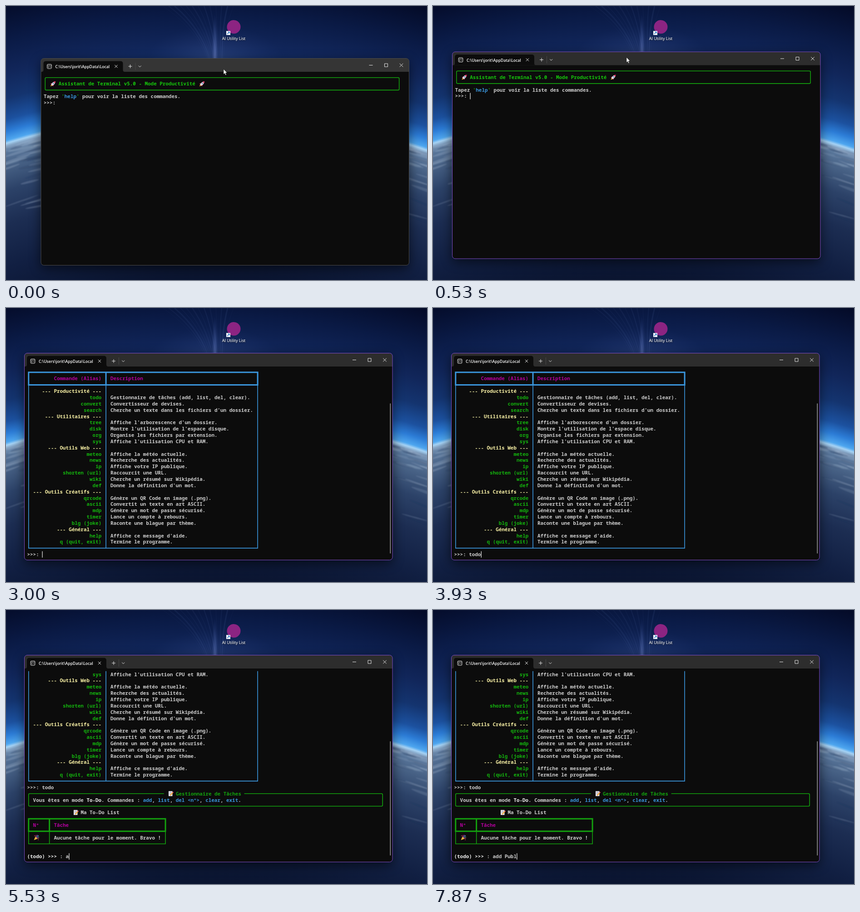
Write an HTML page that moves like this. It is 927 px wide and 604 px high and loops after 8 s.

```html
<!DOCTYPE html>
<html lang="fr">
<head>
<meta charset="utf-8">
<title>Assistant de Terminal</title>
<style>
html, body { margin: 0; width: 100%; height: 100%; overflow: hidden; background: #071029; }
svg { display: block; width: 927px; height: 604px; }
text { white-space: pre; }
.mono { font: 600 10.917px "Noto Sans Mono", "DejaVu Sans Mono", monospace; fill: #ccc; }
.ui { font-family: "Open Sans", "Noto Sans", sans-serif; fill: #fff; }
.strong { font-weight: 700; fill: #f2f2f2; }
</style>
</head>
<body>
<svg id="stage" viewBox="0 0 927 604" xmlns="http://www.w3.org/2000/svg"></svg>
<script>
const LOOP = 8000, STEP = 200 / 3;
const CW = 6.55, LH = 13.846, X0 = 46.5, Y0 = 141.7;
const BLUE = '#3a96dd', GREEN = '#13a10e', LIME = '#16c60c', CMD = '#14b40e',
      PINK = '#b4009e', SAND = '#f9f1a5';

const colX = c => X0 + c * CW;
const midX = c => colX(c + 0.5);
const rowY = r => Y0 + r * LH;
const span = (s, fill) => `<tspan fill="${fill}">${s}</tspan>`;
const strong = s => `<tspan class="strong">${s}</tspan>`;
const put = (c, r, s, fill = '#ccc', extra = '') =>
  `<text class="mono" x="${colX(c)}" y="${rowY(r) + 3.9}" style="fill:${fill}" ${extra}>${s}</text>`;
const line = (d, color, w = 1.6) => `<path d="${d}" fill="none" stroke="${color}" stroke-width="${w}"/>`;

// Table with a heavy header; bounds are given in cells
function grid(r0, r1, mid, right, color) {
  const [l, m, r] = [0, mid, right].map(midX);
  const [t, h, b] = [r0, r0 + 2, r1].map(rowY);
  return line(`M${l} ${t}H${r}V${h}H${l}ZM${m} ${t}V${h}`, color, 3) +
         line(`M${l} ${h}V${b}H${r}V${h}M${m} ${h}V${b}`, color);
}

const at = (x, y, body, turn = 0) => `<g transform="translate(${x} ${y}) rotate(${turn})">${body}</g>`;
const rocket = (x, y) => at(x, y, `
  <path d="M-1.6 4L0 8L1.6 4Z" fill="#ffb02e"/>
  <path d="M-2 0L-4.2 3.6L-2 4ZM2 0L4.2 3.6L2 4Z" fill="#d8245a"/>
  <path d="M0 -7.5C3.2 -4 3 1 2 4H-2C-3 1 -3.2 -4 0 -7.5Z" fill="#dcd9e2"/>
  <path d="M0 -7.5C1.4 -6 2 -5 2.3 -3.8H-2.3C-2 -5 -1.4 -6 0 -7.5Z" fill="#e8315f"/>
  <circle cy="-1.2" r="1.3" fill="#4a6fa8"/>`, 45);
const memo = (x, y) => at(x, y, `
  <path d="M-5 -5.5H3.5V5.5H-5Z" fill="#e9e6ee"/>
  <path d="M-3.5 -3H2M-3.5 -.8H1M-3.5 1.4H-1" stroke="#8f8a9c" stroke-width=".8"/>
  <path d="M-1.5 4L4.3 -2.2" stroke="#f5a52c" stroke-width="2.2"/>
  <path d="M4 -2L5.4 -3.5" stroke="#e8486c" stroke-width="2.2"/>`);
const popper = (x, y) => at(x, y, `
  <path d="M-5.5 5.5L-2.4 -2.2L2.6 2.6Z" fill="#f0b23c"/>
  <path d="M-1 -1C-1 -3 0 -4 -1 -5.5M1 1C3 0 4 2 5.5 1" fill="none" stroke="#d9479c" stroke-width="1.4"/>
  <path d="M0 0C2 -1 2 -4 5 -4.5" fill="none" stroke="#5c8fe0" stroke-width="1.4"/>
  <circle cx="-4" cy="-4" r=".9" fill="#e8486c"/><circle cx="2" cy="-5" r=".9" fill="#a45be0"/>
  <circle cx="4.8" cy="-1.3" r=".9" fill="#3fc08a"/><circle cx="4" cy="4.6" r=".9" fill="#e8486c"/>`);

// Wallpaper: planet limb as one radial gradient plus soft clouds and rays
const limb = [[1130, '#0a142f'], [1240, '#111f42'], [1330, '#1c2d52'], [1400, '#2c4268'],
  [1450, '#466084'], [1480, '#587599'], [1494, '#86a5c5'], [1500, '#a5d2f4'], [1506, '#4ea6ef'],
  [1525, '#2c7cd6'], [1550, '#1c519f'], [1595, '#14346f'], [1650, '#11265a'], [1720, '#0a1a45'],
  [1800, '#040b28']];
let seed = 7;
const rnd = () => (seed = seed * 16807 % 2147483647) / 2147483647;

function clouds() {
  let s = '';
  for (let i = 0; i < 64; i++) {
    const side = i % 2, x = side ? 840 + rnd() * 95 : rnd() * 85;
    const depth = 8 + rnd() * rnd() * 170;
    const y = 1737 - Math.sqrt((1500 - depth) ** 2 - (x - 440) ** 2);
    const tilt = (x - 440) / 26 + rnd() * 8 - 4;
    s += at(x, y, `<ellipse rx="${12 + rnd() * 28}" ry="${1 + rnd() * 2.5}" fill="${rnd() < .65 ? '#b9cbe0' : '#1d3358'}" opacity="${.1 + rnd() * .18}"/>`, tilt);
  }
  return `<g filter="url(#soft)">${s}</g>`;
}
function rays() {
  let s = '';
  for (let i = 0; i < 13; i++)
    s += `<path d="M${345 + i * 13} 0Q${420 + i * 5} 50 ${443 + i * 3} 118" fill="none" stroke="#8fa6e6" stroke-width="${1 + i % 3}" opacity="${.035 + (i % 4) * .012}"/>`;
  return s;
}
const scene = `
<defs>
  <radialGradient id="limb" gradientUnits="userSpaceOnUse" cx="440" cy="1737" r="2000">
    ${limb.map(([r, c]) => `<stop offset="${r / 2000}" stop-color="${c}"/>`).join('')}
  </radialGradient>
  <radialGradient id="beam"><stop offset="0" stop-color="#7d93d8" stop-opacity=".55"/>
    <stop offset="1" stop-color="#4a62b0" stop-opacity="0"/></radialGradient>
  <filter id="soft"><feGaussianBlur stdDeviation="1.3"/></filter>
  <filter id="shade" x="-20%" y="-20%" width="140%" height="140%"><feGaussianBlur stdDeviation="13"/></filter>
  <filter id="drop"><feDropShadow dx=".6" dy=".8" stdDeviation=".8" flood-color="#000"/></filter>
  <clipPath id="view"><path d="M41 134.8H850V555H41Z"/></clipPath>
  <clipPath id="tabClip"><path d="M70 108H191.5V126H70Z"/></clipPath>
  <path id="arrow" d="M0 0V11.6L2.6 9.2L4.4 13.4L6.3 12.6L4.5 8.5H8Z" fill="#fff" stroke="#000" stroke-width=".6"/>
</defs>
<rect width="927" height="604" fill="url(#limb)"/>
${clouds()}${rays()}
<ellipse cx="460" cy="118" rx="150" ry="75" fill="url(#beam)" opacity=".35"/>
<ellipse cx="460" cy="118" rx="7" ry="100" fill="url(#beam)"/>
<circle cx="501.5" cy="46" r="15" fill="#8c2482"/>
<rect x="485" y="55" width="9" height="9" fill="#f4f6fa"/>
<path d="M487 62L491.6 57.4M488.6 57H492V60.4" fill="none" stroke="#1f6fc4" stroke-width="1.2"/>
<text class="ui" x="501.5" y="75" font-size="9" text-anchor="middle" filter="url(#drop)">AI Utility List</text>`;

const frame = `
<rect x="40" y="106" width="811" height="456" rx="8" opacity=".6" filter="url(#shade)"/>
<rect x="40.5" y="99.5" width="810.5" height="456" rx="6.5" fill="#0c0c0c"/>
<path id="bar" d="M40.5 129V106A6.5 6.5 0 0 1 47 99.5H844.5A6.5 6.5 0 0 1 851 106V129Z"/>
<path d="M42 129Q46 129 46 125V111Q46 105.5 51.5 105.5H215.5Q221 105.5 221 111V125Q221 129 225 129Z" fill="#0c0c0c"/>
<g fill="none" stroke="#e4e4e4" stroke-width="1">
  <rect x="54.2" y="112.4" width="9.6" height="9.6" rx="1.8"/>
  <path d="M54.2 115H63.8M58 117.2H56.4V119.8H58M59.3 117.6V118M59.3 119.4V119.8M60.6 117L62 120"  stroke-width=".8"/>
  <path d="M202.8 113.8L209.2 120.2M209.2 113.8L202.8 120.2M233 117H241M237 113V121M255.2 115.6L258.2 118.6L261.2 115.6"/>
  <path d="M763 114.5H771M797 111H804V118H797ZM830.2 110.8L837.8 118.2M837.8 110.8L830.2 118.2"/>
  <path d="M248.5 109V125" stroke="#484848"/>
</g>
<g clip-path="url(#tabClip)"><text class="ui" x="72" y="121" font-size="8.65" font-weight="600">C:\\Users\\jorit\\AppData\\Local\\P</text></g>`;

const welcome =
  `<rect x="${midX(0)}" y="${rowY(0)}" width="${119 * CW}" height="${2 * LH}" rx="2.5" fill="none" stroke="${GREEN}" stroke-width="1.6"/>` +
  rocket(67, rowY(1)) + put(5, 1, 'Assistant de Terminal v5.0 - Mode Productivité', LIME) + rocket(395, rowY(1)) +
  put(0, 3, `Tapez ${span("'", GREEN)}${span('help', BLUE)}${span("'", GREEN)} pour voir la liste des commandes.`);

const entries = `# Productivité
todo|Gestionnaire de tâches (add, list, del, clear).
convert|Convertisseur de devises.
search|Cherche un texte dans les fichiers d'un dossier.
# Utilitaires
tree|Affiche l'arborescence d'un dossier.
disk|Montre l'utilisation de l'espace disque.
org|Organise les fichiers par extension.
sys|Affiche l'utilisation CPU et RAM.
# Outils Web
meteo|Affiche la météo actuelle.
news|Recherche des actualités.
ip|Affiche votre IP publique.
shorten (url)|Raccourcit une URL.
wiki|Cherche un résumé sur Wikipédia.
def|Donne la définition d'un mot.
# Outils Créatifs
qrcode|Génère un QR Code en image (.png).
ascii|Convertit un texte en art ASCII.
mdp|Génère un mot de passe sécurisé.
timer|Lance un compte à rebours.
blg (joke)|Raconte une blague par thème.
# Général
help|Affiche ce message d'aide.
q (quit, exit)|Termine le programme.`.split('\n');

const rightPut = (r, s, fill) => put(25 - s.length, r, s, fill);
const help = grid(0, 28, 26, 77, BLUE) +
  rightPut(1, 'Commande (Alias)', PINK) + put(28, 1, 'Description', PINK) +
  entries.map((e, i) => {
    const [name, text] = e.split('|');
    return text ? rightPut(i + 3, name, CMD) + put(28, i + 3, text)
                : rightPut(i + 3, `--- ${name.slice(2)} ---`, SAND);
  }).join('');

const keys = ['add', 'list', 'del &lt;n°&gt;', 'clear', 'exit'].map(k => span(k, BLUE)).join(', ');
const [pl, pr, pt, pb] = [midX(0), midX(119), rowY(30), rowY(32)];
const todo =
  line(`M${colX(46)} ${pt}H${pl + 2.5}Q${pl} ${pt} ${pl} ${pt + 2.5}V${pb - 2.5}Q${pl} ${pb} ${pl + 2.5} ${pb}H${pr - 2.5}Q${pr} ${pb} ${pr} ${pb - 2.5}V${pt + 2.5}Q${pr} ${pt} ${pr - 2.5} ${pt}H${colX(73)}`, GREEN) +
  memo(363, pt) + put(50, 30, 'Gestionnaire de Tâches', GREEN) +
  put(2, 31, `Vous êtes en mode ${strong('To-Do')}. Commandes : ${keys}.`) +
  memo(154, rowY(33)) + put(18, 33, 'Ma To-Do List', '#ccc', 'font-style="italic"') +
  grid(34, 38, 7, 46, GREEN) + put(2, 35, 'N°', PINK) + put(9, 35, 'Tâche', PINK) +
  popper(67, rowY(37)) + put(9, 37, 'Aucune tâche pour le moment. Bravo !');

const prompt = (r, id) => put(0, r, `&gt;&gt;&gt;: <tspan id="${id}"></tspan>`);
const stage = document.getElementById('stage');
stage.innerHTML = scene + `<g id="win">${frame}
  <g clip-path="url(#view)"><g id="page">
    <g id="welcome">${welcome}${prompt(4, 'in0')}</g>
    <g id="help">${help}${prompt(29, 'in1')}</g>
    <g id="todo">${todo}${put(0, 40, strong('(todo) &gt;&gt;&gt;') + ' : <tspan id="in2"></tspan>')}</g>
    <rect id="caret" width="1.2" height="14" fill="#f2f2f2"/>
  </g></g>
  <path id="thumb" fill="none" stroke="#a0a0a0" stroke-width="1.5" stroke-linecap="round"/>
  <rect id="edge" x="40.5" y="99.5" width="810.5" height="456" rx="6.5" fill="none"/>
</g><use id="ghost" href="#arrow" x="442" y="119.5"/><use id="mouse" href="#arrow"/>`;

const el = {};
stage.querySelectorAll('[id]').forEach(n => el[n.id] = n);

// Screens: start, typed text with key times, prompt row and column, scroll in rows
const screens = [
  { from: 0, text: 'help', times: [1800, 2070, 2330, 2400], row: 4, col: 5, scroll: 0 },
  { from: 3000, text: 'todo', times: [3530, 3670, 3870, 3930], row: 29, col: 5, scroll: 0, thumb: 210 },
  { from: 4530, text: 'add Publ', times: [5530, 5870, 6000, 6130, 7070, 7400, 7730, 7870], row: 40, col: 13, scroll: 11, thumb: 289 }
];
const caretOn = [[465, 1000], [1530, 5130], [5530, LOOP]];
const winPath = [[0, 36.5, 16], [4, 36.5, 16], [6, 22.5, 10.5], [8, 2, 1.5], [9, 0, 0]];
const mousePath = [[0, 479, 139], [4, 461, 127], [6, 449, 122], [8, 426, 113], [9, 424, 111], [13, 336, 247]];

function along(path, s) {
  const i = path.findIndex(p => p[0] > s);
  if (i < 0) return path[path.length - 1].slice(1);
  const a = path[i - 1], b = path[i], k = (s - a[0]) / (b[0] - a[0]);
  return [a[1] + (b[1] - a[1]) * k, a[2] + (b[2] - a[2]) * k];
}
const show = (n, on) => n.setAttribute('display', on ? 'inline' : 'none');

function draw(t) {
  const step = Math.floor((t + 4) / STEP);
  el.win.setAttribute('transform', `translate(${along(winPath, step)})`);
  el.mouse.setAttribute('transform', `translate(${along(mousePath, step)})`);
  show(el.mouse, t < 1800);
  show(el.ghost, step === 6);
  el.bar.setAttribute('fill', step < 7 ? '#353535' : '#2d2d2d');
  el.edge.setAttribute('stroke', step < 1 ? '#4a4a4a' : '#7f4cc4');

  const n = screens.filter(s => t >= s.from).length - 1, cur = screens[n];
  screens.forEach((s, i) => {
    s.len = s.times.filter(k => t >= k).length;
    el['in' + i].textContent = s.text.slice(0, s.len);
  });
  show(el.welcome, n === 0);
  show(el.help, n > 0);
  show(el.todo, n > 1);
  el.page.setAttribute('transform', `translate(0 ${-cur.scroll * LH})`);
  show(el.thumb, cur.thumb);
  if (cur.thumb) el.thumb.setAttribute('d', `M846.3 ${cur.thumb + 1}V540.5`);
  el.caret.setAttribute('x', colX(cur.col + cur.len) + .2);
  el.caret.setAttribute('y', rowY(cur.row) - 7);
  show(el.caret, caretOn.some(([a, b]) => t >= a && t < b));
}

function tick() {
  draw(performance.now() % LOOP);
  requestAnimationFrame(tick);
}
tick();
</script>
</body>
</html>
```
